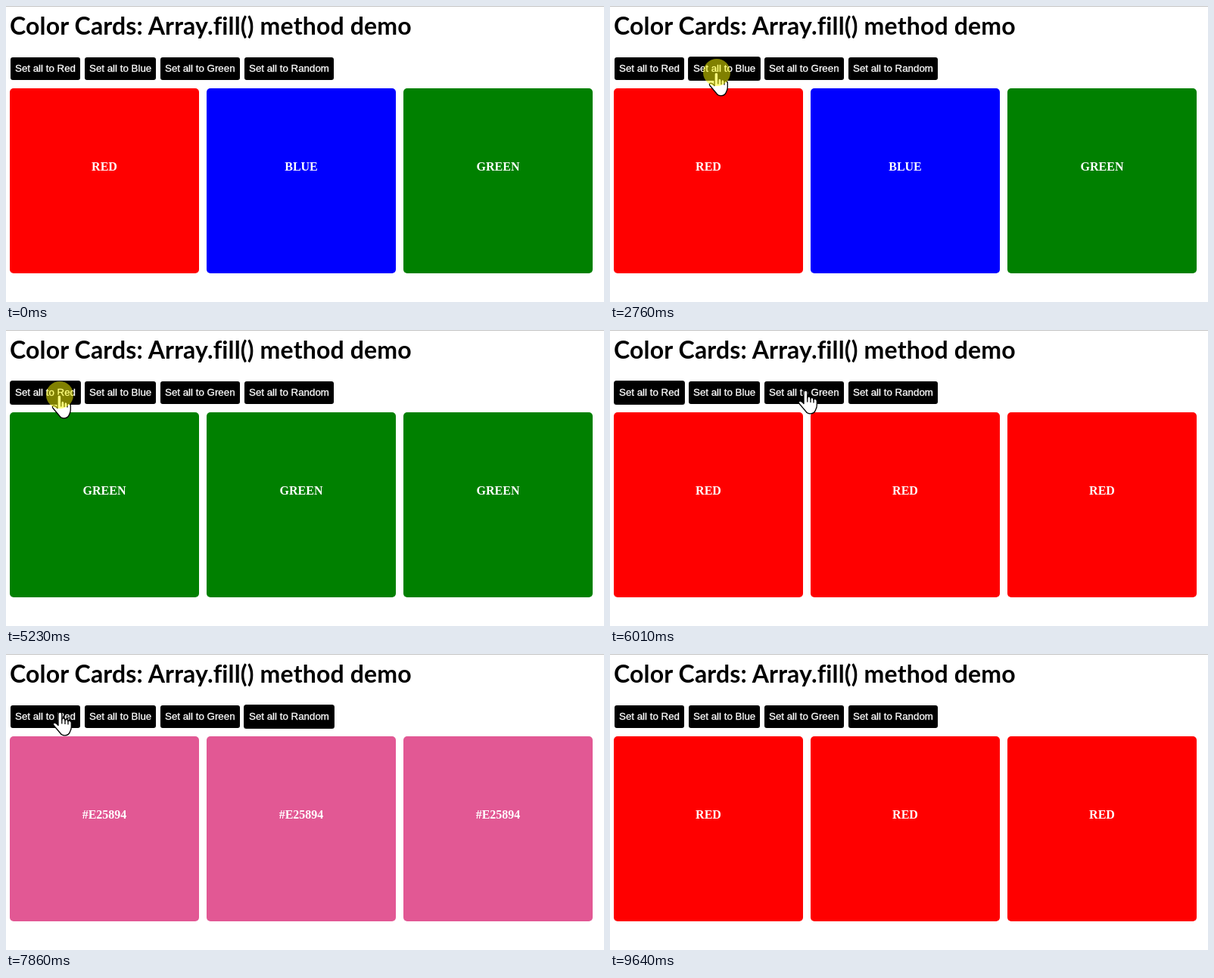
These frames come from a looping animation (790 by 392 pixels, 9730 ms). An HTML page:

```html
<!DOCTYPE html>
<html lang="en">
<head>
<meta charset="utf-8">
<title>Color Cards</title>
<style>
  html, body { margin: 0; width: 100%; height: 100%; overflow: hidden; background: #fff; }
  svg { display: block; width: 790px; height: 392px; }
  .title { font: 700 32px Lato, sans-serif; letter-spacing: .16px; font-variant-ligatures: common-ligatures; }
  .label { font: 13.333px "Liberation Sans", Arial, sans-serif; fill: #fff; stroke: #fff; stroke-width: .3; }
  .name { font: 700 16px "Liberation Serif", "Times New Roman", serif; fill: #fff; text-anchor: middle; }
  .pointer path { fill: #fff; stroke: #000; stroke-width: 1.3; stroke-linejoin: round; }
</style>
</head>
<body>
<svg id="stage" viewBox="0 0 790 392" xmlns="http://www.w3.org/2000/svg">
  <rect width="790" height="392" fill="#fff"/>
  <rect width="790" height="1" fill="#c4c4c4"/>
  <text class="title" x="5" y="38">Color Cards: Array.fill() method demo</text>
  <rect id="ring" y="67" height="32" rx="3.5" fill="#101010"/>
  <g id="buttons"></g>
  <g id="cards"></g>
  <g id="pointer" class="pointer">
    <path id="arrow" d="M.6 .8V25L6 19.8L9.8 28.4L13.4 26.8L9.7 18.2H17.4Z"/>
    <g id="hand" transform="translate(-10.6 -.5)">
      <path d="M7.6 18V3Q7.6 .7 10 .7Q12.4 .7 12.4 3V10.5Q12.6 8.5 14.5 8.7Q16.6 9 16.6 11.5Q17 9.8 18.6 10Q20.6 10.3 20.6 12.8Q21 11.5 22.5 11.8Q24.9 12.2 24.9 14.5V20Q24.9 23 23.5 25.5Q22 31.3 16 31.3Q12 31.3 10.5 28.5L1.6 18Q.2 15.8 2 14.8Q4 14.2 7.6 18Z"/>
      <path d="M12.4 10V16M16.6 11V16.5M20.6 12.5V17" style="fill:none"/>
    </g>
  </g>
  <circle id="spot" r="18" fill="#ff0" fill-opacity=".5"/>
</svg>
<script>
const LOOP = 9730;
const $ = id => document.getElementById(id);

function add(parent, tag, attrs, text = "") {
  const el = document.createElementNS("http://www.w3.org/2000/svg", tag);
  set(el, attrs);
  el.textContent = text;
  parent.appendChild(el);
  return el;
}
function set(el, attrs) {
  for (const key in attrs) el.setAttribute(key, attrs[key]);
}
function show(el, on) {
  el.style.display = on ? "" : "none";
}

const buttons = [
  { x: 6, w: 92, to: "Red" },
  { x: 104, w: 94, to: "Blue" },
  { x: 204, w: 105, to: "Green" },
  { x: 315, w: 118, to: "Random" }
];
for (const b of buttons) {
  add($("buttons"), "rect", { x: b.x, y: 68, width: b.w, height: 30, rx: 3 });
  add($("buttons"), "text", { x: b.x + 6, y: 87, class: "label" }, "Set all to " + b.to);
}

const cards = [5, 265, 525].map(x => ({
  box: add($("cards"), "rect", { x, y: 109, width: 250, height: 245, rx: 5 }),
  name: add($("cards"), "text", { x: x + 125, y: 218, class: "name" })
}));

const fills = { RED: "#f00", BLUE: "#00f", GREEN: "#008000", "#E25894": "#e25894" };

// button index, time pressed, time released, colour set on release
const clicks = [
  [1, 2760, 2840, "BLUE"],
  [2, 4080, 4230, "GREEN"],
  [0, 5230, 5380, "RED"],
  [3, 6390, 6620, "#E25894"],
  [0, 7950, 8110, "RED"]
];
const ENTER = 1380, LEAVE = 9260, BLUR = 9640;

// first step, last step, step count, destination, optional bend
const start = [35, 355];
const moves = [
  [1457, 1840, 6, [56, 53], [70, 204]],
  [1990, 2380, 6, [141, 88]],
  [3450, 3760, 5, [258, 90]],
  [4690, 5080, 6, [71, 86]],
  [5860, 6160, 5, [361, 77]],
  [7330, 7630, 5, [73, 77]],
  [7860, 7860, 1, [72, 77]],
  [8640, 9260, 9, [655, 396]]
];

const ease = u => u * u * (3 - 2 * u);

function pointerAt(t) {
  let from = start;
  for (const [t0, t1, n, to, bend] of moves) {
    if (t < t0) break;
    const dt = (t1 - t0) / (n - 1) || 1;
    const step = Math.min(n, Math.floor((t - t0) / dt + 1e-6) + 1);
    const u = ease(step / n);
    if (step < n) {
      return from.map((a, i) => {
        const mid = bend ? bend[i] : (a + to[i]) / 2;
        return a * (1 - u) ** 2 + 2 * mid * u * (1 - u) + to[i] * u * u;
      });
    }
    from = to;
  }
  return from;
}

function draw(t) {
  const [x, y] = pointerAt(t).map(Math.round);
  let names = ["RED", "BLUE", "GREEN"];
  let focus = null, pressed = false;
  for (const [index, down, up, name] of clicks) {
    if (t >= down) focus = buttons[index];
    if (t >= down && t < up) pressed = true;
    if (t >= up) names = [name, name, name];
  }
  cards.forEach((card, i) => {
    set(card.box, { fill: fills[names[i]] });
    card.name.textContent = names[i];
  });

  if (t >= BLUR) focus = null;
  show($("ring"), focus);
  if (focus) set($("ring"), { x: focus.x - 1, width: focus.w + 2 });

  const over = y >= 68 && y < 98 && buttons.some(b => x >= b.x && x < b.x + b.w);
  show($("pointer"), t >= ENTER && t < LEAVE);
  show($("hand"), over);
  show($("arrow"), !over);
  set($("pointer"), { transform: `translate(${x} ${y})` });

  show($("spot"), pressed);
  set($("spot"), { cx: x, cy: y });
}

const begin = performance.now();
function tick() {
  draw((performance.now() - begin) % LOOP);
  requestAnimationFrame(tick);
}
draw(0);
requestAnimationFrame(tick);
</script>
</body>
</html>
```
